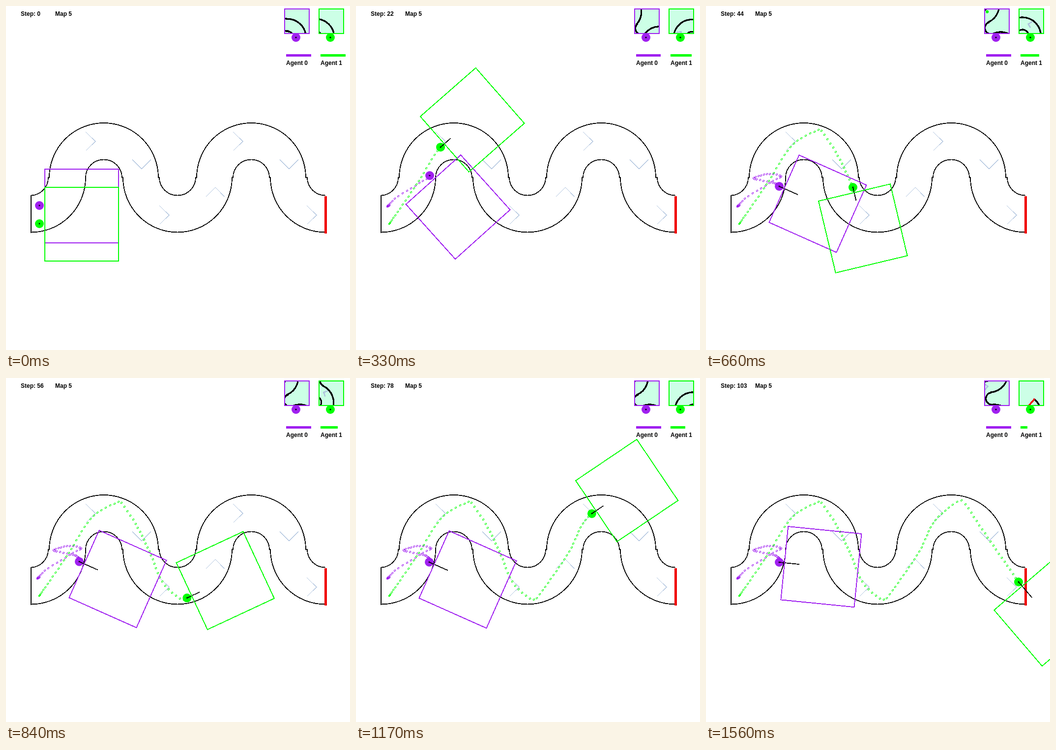
An HTML page for the animation above (1.59 s loop, 700 by 700 pixels).

```html
<!DOCTYPE html>
<html lang="en">
<head>
<meta charset="utf-8">
<title>Agents on a winding track</title>
<style>
html, body { margin: 0; width: 100%; height: 100%; overflow: hidden; background: #fff; }
#stage { display: block; width: 100vw; height: 100vh; }
text { font: bold 12px "Liberation Sans", Arial, sans-serif; fill: #000; }
path, rect, .trail { shape-rendering: crispEdges; }
.wall, .arrow, .finish, .box, .trail { fill: none; }
.wall { stroke: #000; stroke-width: 1.8; }
.arrow { stroke: #b0c4de; stroke-width: 1; }
.finish { stroke: #f00000; stroke-width: 5; }
.box { stroke-width: 1.9; }
.trail { stroke-width: 1; }
.nose { stroke: #000; stroke-width: 1.8; }
.mini .wall, .mini .finish { stroke-width: 10; }
.mini .arrow { stroke-width: 8; }
</style>
</head>
<body>
<svg id="stage" viewBox="0 0 700 700"></svg>
<script>
const FRAME = 30, FRAMES = 53, LAST = 103;
const SIDE = 150, NEAR = 10.2, MINI_NEAR = 5;

const walls = 'M51 385V462M51 385.5A36 36.5 0 0 0 86 349H88A111 111 0 0 1 310 349H312' +
  'A37 36.5 0 0 0 386 349H388A111 111 0 0 1 610 349H613A37 36.5 0 0 0 650 385.5' +
  'M51 460.5A111 111.5 0 0 0 162 349A37 36.5 0 0 1 236 349H238A111 111.5 0 0 0 460 349H462' +
  'A37 36.5 0 0 1 536 349H538A112 111.5 0 0 0 650 460.5';
const right = (x, y) => `M${x} ${y}l19.5 19l-19.5 19`;
const bend = x => right(x + 162.5, 256.5) + `M${x + 257} 312.5l19 19l19 -19` + right(x + 312.5, 406.5);
const arrows = bend(0) + 'M407 388l19 -19l18.5 19' + bend(300);
const track = `<path class="arrow" d="${arrows}"/><path class="wall" d="${walls}"/>` +
  '<path class="finish" d="M650.5 387V463"/>';

// Keys are [step, value...]: path is a spline, the others run straight between keys.
const agents = [
  {
    color: '#a020f0', legend: 570,
    path: [[0, 68, 406], [3, 64, 408], [8, 67, 404], [11, 79, 392], [14, 104, 376], [18, 136, 356],
      [21, 153, 347], [25, 130, 342], [30, 101, 347.5], [31, 97, 350], [33, 103, 353],
      [38, 137, 360], [44, 149, 367], [50, 149, 373], [103, 149, 375]],
    turn: [[0, 0], [6, -66], [14, 36], [30, 60], [44, 24], [97, 24], [103, 5.7]],
    thrust: [[0, 0], [14, -8], [30, 5], [44, 41.5], [103, 41.5]],
    energy: [[0, 51], [14, 49], [30, 51], [103, 51]]
  },
  {
    color: '#00ff00', legend: 640,
    path: [[0, 68, 443], [14, 128, 356], [20, 160, 303], [24, 186, 274], [29, 229, 252], [30, 235, 254],
      [35, 264, 297], [44, 299, 369], [48, 313, 406], [52, 338, 437], [55, 362, 451], [57, 374, 440],
      [68, 434, 353], [75, 462, 296], [80, 494, 264], [83, 520, 249], [84, 528, 257],
      [90, 562, 308], [103, 636, 415]],
    turn: [[0, 0], [6, -52], [14, -55.5], [20, -55], [28, 0], [30, 70.6], [44, 76.6], [47, 38],
      [54, 0], [58, -50], [68, -61.6], [74, -58], [82, -10], [86, 55], [103, 49.4]],
    thrust: [[0, 0], [3, 27], [87, 28.5], [90, 42], [103, 42]],
    energy: [[0, 51], [14, 45], [90, 27], [103, 14]]
  }
];

function segment(keys, step) {
  let i = 1;
  while (i < keys.length - 1 && keys[i][0] < step) i++;
  return i;
}

function line(keys, step) {
  const i = segment(keys, step), [s0, v0] = keys[i - 1], [s1, v1] = keys[i];
  return v0 + (v1 - v0) * (step - s0) / (s1 - s0);
}

// Hermite spline that starts from rest.
function spline(keys, step) {
  const i = segment(keys, step), a = keys[i - 1], b = keys[i];
  const span = b[0] - a[0], u = (step - a[0]) / span, w = 1 - u;
  const slope = (n, axis) => {
    if (n === 0) return 0;
    const p = keys[n - 1], q = keys[Math.min(n + 1, keys.length - 1)];
    return (q[axis] - p[axis]) / (q[0] - p[0]);
  };
  return [1, 2].map(axis =>
    a[axis] * w * w * (1 + 2 * u) + b[axis] * u * u * (3 - 2 * u) +
    span * u * w * (w * slope(i - 1, axis) - u * slope(i, axis)));
}

const disc = (x, y, color, r = 9) => `<circle cx="${x}" cy="${y}" r="${r}" fill="${color}"/>`;

function pose(agent, step) {
  const [x, y] = spline(agent.path, step);
  return { x, y, turn: line(agent.turn, step), thrust: line(agent.thrust, step) };
}

function trail(agent, step) {
  let out = '';
  for (let s = 0; s < step; s++) {
    const [x, y] = spline(agent.path, s).map(Math.round);
    out += `<circle cx="${x}" cy="${y}" r="1.5"/>`;
  }
  return `<g class="trail" stroke="${agent.color}">${out}</g>`;
}

function body(agent, p) {
  return disc(p.x, p.y, agent.color) + disc(p.x, p.y, '#000', 1.4) +
    `<g transform="translate(${p.x} ${p.y}) rotate(${p.turn})">` +
    `<path class="nose" d="M0 0H${p.thrust}"/></g>`;
}

function viewBox(agent, p) {
  return `<g transform="translate(${p.x + 0.6} ${p.y + 0.7}) rotate(${p.turn})">` +
    `<rect class="box" stroke="${agent.color}" x="${NEAR}" y="${-SIDE / 2}" width="${SIDE}" height="${SIDE}"/></g>`;
}

// Egocentric view: heading points up, agent sits just below the window.
function miniMap(agent, p, other, otherPose) {
  const x = agent.legend - 3;
  return `<rect x="${x}" y="6" width="50" height="50" fill="#ccffe6"/>` +
    `<svg class="mini" x="${x}" y="6" width="50" height="50" overflow="hidden" ` +
    `viewBox="${-SIDE / 2} ${-MINI_NEAR - SIDE} ${SIDE} ${SIDE}">` +
    `<g transform="rotate(${-90 - p.turn}) translate(${-p.x} ${-p.y})">` +
    track + disc(otherPose.x, otherPose.y, other.color) + '</g></svg>' +
    `<rect class="box" stroke="${agent.color}" x="${x}" y="6" width="50" height="50"/>`;
}

function panel(agent, i, step) {
  const x = agent.legend;
  return disc(x + 20, 64, agent.color) + disc(x + 20, 64, '#000', 1.6) +
    `<rect x="${x}" y="98" width="${Math.round(line(agent.energy, step))}" height="5" fill="${agent.color}"/>` +
    `<text x="${x}" y="120">Agent ${i}</text>`;
}

const stage = document.getElementById('stage');
let shown = -1;

function draw(step) {
  const poses = agents.map(a => pose(a, step));
  const each = fn => agents.map(fn).join('');
  stage.innerHTML = track +
    each(a => trail(a, step)) +
    each((a, i) => body(a, poses[i])) +
    each((a, i) => viewBox(a, poses[i])) +
    each((a, i) => miniMap(a, poses[i], agents[1 - i], poses[1 - i])) +
    each((a, i) => panel(a, i, step)) +
    `<text x="30" y="20">Step: ${step}</text><text x="100" y="20">Map 5</text>`;
}

const start = performance.now();

function tick(now) {
  const frame = Math.floor(Math.max(0, now - start) / FRAME) % FRAMES;
  if (frame !== shown) {
    shown = frame;
    draw(Math.min(frame * 2, LAST));
  }
  requestAnimationFrame(tick);
}

tick(start);
</script>
</body>
</html>
```
